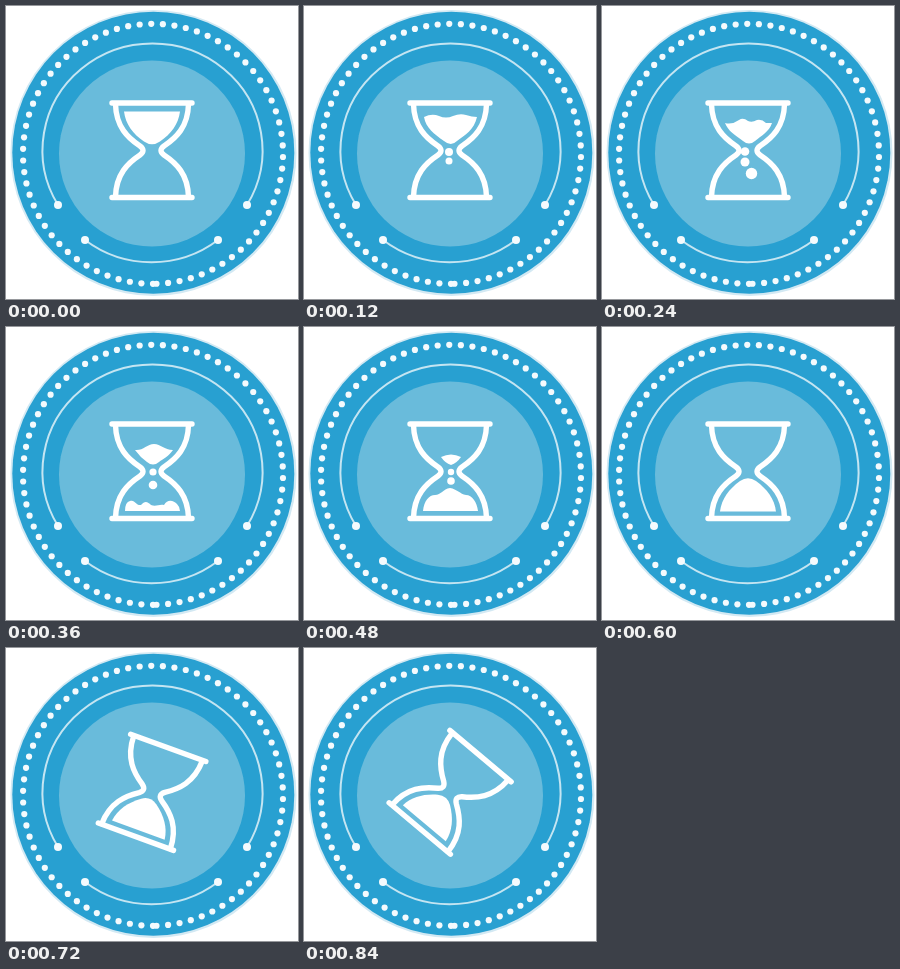
Animation of 292 by 293 pixels, one loop 960 ms. Source, as an HTML page:

```html
<!DOCTYPE html>
<html lang="en">
<head>
<meta charset="utf-8">
<title>Hourglass</title>
<style>
  html, body { margin: 0; width: 100%; height: 100%; overflow: hidden; background: #fff; }
  svg { display: block; width: 100vw; height: 100vh; }
</style>
</head>
<body>
<svg viewBox="0 0 292 293">
  <filter id="soft" filterUnits="userSpaceOnUse" x="0" y="0" width="292" height="293" color-interpolation-filters="sRGB">
    <feGaussianBlur stdDeviation=".75"/>
  </filter>
  <g filter="url(#soft)">
    <circle cx="147.5" cy="147" r="143" fill="#d3e9f3"/>
    <circle cx="147.300" cy="146.800" r="141" fill="#28a0d1"/>
    <g id="beads" fill="#f4fafd"></g>
    <g fill="none" stroke="#c4e5f2" stroke-width="2">
      <path d="M52 199A110 106.800 0 1 1 241 199"/>
      <path d="M79 234A110.500 110.500 0 0 0 212 234"/>
    </g>
    <g fill="#f4fafd">
      <circle cx="52" cy="199" r="4"/><circle cx="241" cy="199" r="4"/>
      <circle cx="79" cy="234" r="4"/><circle cx="212" cy="234" r="4"/>
    </g>
    <circle cx="146" cy="147.500" r="93" fill="#69bbdb"/>
    <g id="glass" fill="#fff">
      <g fill="none" stroke="#fff" stroke-width="5.400" stroke-linecap="round">
        <path d="M106 97H186M106 191.500H186"/>
        <path id="side" d="M109.500 98C110 121 122 132 134 140Q140 144.500 134 149C122 157 110 168 109.500 191"/>
        <use href="#side" transform="translate(292 0) scale(-1 1)"/>
      </g>
      <path id="upper"/>
      <path id="lower"/>
      <g id="drops"></g>
    </g>
  </g>
</svg>
<script>
const STEP = 120;
const $ = id => document.getElementById(id);
const circle = ([x, y, r]) => `<circle cx="${x}" cy="${y}" r="${r}"/>`;

const FULL_TOP = 'M118 105.5H174C172.5 118 165 128 154 135.500Q146 141 138 135.500C127 128 119.500 118 118 105.500Z';
const FULL_BOTTOM = 'M118 184.500H174C172.500 172 165 162 154 154Q146 148.500 138 154C127 162 119.500 172 118 184.500Z';

// One pose per step: sand above, sand below, falling grains, tilt.
const poses = [
  { upper: FULL_TOP },
  { upper: 'M120 111Q128 107 135 110T149 110T162 109T173 111C170 124 161 129 153 135Q147 141 140 135C130 128 122 122 120 111Z',
    drops: [[145, 146, 4], [145, 155, 3.5]] },
  { upper: 'M123 117Q130 119 137 114Q141 111 146 115Q150 117 155 114Q160 113 164 117L170 117C167 126 159 130 153 135Q147 140 141 135C133 129 126 125 123 117Z',
    drops: [[143, 145.5, 4.3], [143, 156, 4.5], [149.5, 167.5, 5.7]] },
  { upper: 'M129 123C137 124 141 117 148 117C155 117 158 123 167 123C163 129 157 132 153 135Q147 140 141 135Q134 130 129 123Z',
    lower: 'M119 184Q119 175 124 174C129 172 130 179 135 178C139 173 142 175 145 178C150 180 153 177 158 178C162 171 168 174 171 177Q174 180 174 184Z',
    drops: [[147, 145, 3.6], [147, 158, 4.3]] },
  { upper: 'M137 130Q147 125 157 130Q153 136 147 138Q141 136 137 130Z',
    lower: 'M119 184C120 174 125 168 131 168C137 168 139 162 146 161C153 162 156 167 162 168C168 168 173 175 174 184Z',
    drops: [[147, 145, 3.2], [147, 154, 3.8]] },
  { lower: FULL_BOTTOM },
  { lower: FULL_BOTTOM, tilt: 20 },
  { lower: FULL_BOTTOM, tilt: 40 }
];

// The ring starts at the bottom, runs clockwise and does not close on a whole bead.
const BEADS_PER_TURN = 70.3;
$('beads').innerHTML = Array.from({ length: 71 }, (_, i) => {
  const a = i / BEADS_PER_TURN * 2 * Math.PI;
  return circle([147 - 130 * Math.sin(a), 147.8 + 130 * Math.cos(a), 3.1]);
}).join('');

let shown = -1;
function draw() {
  const step = Math.floor(performance.now() / STEP) % poses.length;
  if (step !== shown) {
    const { upper = '', lower = '', drops = [], tilt = 0 } = poses[step];
    $('upper').setAttribute('d', upper);
    $('lower').setAttribute('d', lower);
    $('drops').innerHTML = drops.map(circle).join('');
    $('glass').setAttribute('transform', `rotate(${tilt} 146 144.5)`);
    shown = step;
  }
  requestAnimationFrame(draw);
}
draw();
</script>
</body>
</html>
```
